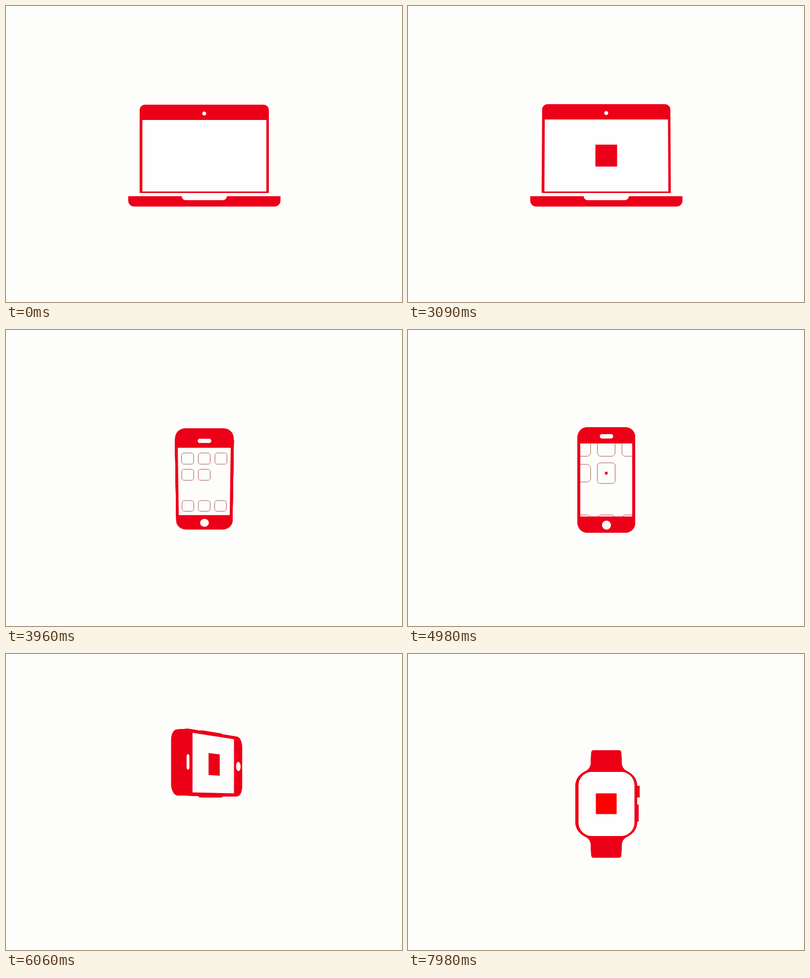
Write an HTML page with a canvas that moves like this. It is 800 px wide and 600 px high and loops after 8 s.

```html
<!DOCTYPE html>
<html lang="en">
<head>
<meta charset="utf-8">
<title>Devices</title>
<style>
  html, body { margin: 0; width: 100%; height: 100%; overflow: hidden; background: #fdfdfb; }
  canvas { display: block; }
</style>
</head>
<body>
<canvas id="stage" width="800" height="600"></canvas>
<script>
const ctx = document.getElementById('stage').getContext('2d');
const LOOP = 8000, CX = 400.5, CY = 304;
const RED = '#ec0018', BRIGHT = '#fe0000', PAPER = '#fdfdfb', SCREEN = '#fefefe';
const LINE = '#a0504a', SELECT = '#dd6040';
const RAD = Math.PI / 180;

// --- timing ---
const cubic = p => p < 0.5 ? 4 * p ** 3 : 1 - 4 * (1 - p) ** 3;
const out = p => 1 - (1 - p) ** 3;
const linear = p => p;

function tween(t, keys, ease = cubic) {
  if (t <= keys[0][0]) return keys[0][1];
  for (let i = 1; i < keys.length; i++) {
    const [t0, v0] = keys[i - 1], [t1, v1] = keys[i];
    if (t < t1) return v0 + (v1 - v0) * ease((t - t0) / (t1 - t0));
  }
  return keys[keys.length - 1][1];
}

// --- outlines, in coordinates around the stage centre ---
function box(x0, y0, x1, y1, r = 0, rBottom = r) {
  const points = [];
  const corner = (x, y, radius, start) => {
    const steps = radius ? 10 : 0;
    for (let i = 0; i <= steps; i++) {
      const a = (start + (steps ? 90 * i / steps : 0)) * RAD;
      points.push([x + radius * Math.cos(a), y + radius * Math.sin(a)]);
    }
  };
  corner(x0 + r, y0 + r, r, 180);
  corner(x1 - r, y0 + r, r, 270);
  corner(x1 - rBottom, y1 - rBottom, rBottom, 0);
  corner(x0 + rBottom, y1 - rBottom, rBottom, 90);
  return points;
}
const centred = (x, y, w, h, r) => box(x - w / 2, y - h / 2, x + w / 2, y + h / 2, r);
const disc = (x, y, r) => centred(x, y, 2 * r, 2 * r, r);

function watchOutline() {
  const curve = (a, c, b) => Array.from({ length: 9 }, (_, i) => {
    const u = i / 8, v = 1 - u;
    return [0, 1].map(n => v * v * a[n] + 2 * u * v * c[n] + u * u * b[n]);
  });
  const quarter = [
    ...curve([25, -109], [30, -109], [30.5, -103]),
    ...curve([31, -83], [32, -71], [43, -66]),
    ...curve([43, -66], [62.5, -56], [62.5, -35])
  ];
  const flip = (list, sx, sy) => list.map(([x, y]) => [x * sx, y * sy]);
  const right = [...quarter, ...flip(quarter, 1, -1).reverse()];
  return [...right, ...flip(right, -1, 1).reverse()];
}
const WATCH = watchOutline();

// --- projection ---
function projector(pose) {
  const { rx = 0, ry = 0, rz = 0, sx = 1, sy = 1, scale = 1,
          x: dx = 0, y: dy = 0, pivot = 0, d = 1450, depth = 0 } = pose;
  const [cx, cy, cz] = [rx, ry, rz].map(a => Math.cos(a * RAD));
  const [nx, ny, nz] = [rx, ry, rz].map(a => Math.sin(a * RAD));
  return ([px, py], pz = depth / 2) => {
    px *= sx;
    py = (py - pivot) * sy;
    let x = px * cz - py * nz, y = px * nz + py * cz, z = pz;
    [y, z] = [y * cx + z * nx, z * cx - y * nx];
    [x, z] = [x * cy + z * ny, z * cy - x * ny];
    const k = d / (d + scale * (depth / 2 - z));
    return [CX + (x * scale + dx) * k, CY + (y * scale + dy + pivot) * k];
  };
}

function trace(project, points, z) {
  ctx.beginPath();
  points.forEach(p => ctx.lineTo(...project(p, z)));
  ctx.closePath();
}
function fill(project, points, color, z) {
  trace(project, points, z);
  ctx.fillStyle = color;
  ctx.fill();
}
function stroke(project, points, color) {
  trace(project, points);
  ctx.strokeStyle = color;
  ctx.lineWidth = 1;
  ctx.stroke();
}
function extrude(project, points, from, to) {
  for (let z = from; z < to; z++) fill(project, points, RED, z);
  fill(project, points, RED, to);
}
function clipped(project, points, draw) {
  ctx.save();
  trace(project, points);
  ctx.clip();
  draw();
  ctx.restore();
}
const emblem = (project, y, size, color = RED) => {
  if (size > 0.2) fill(project, centred(0, y, size, size), color);
};

// --- laptop ---
const LID_SCREEN = box(-125, -73, 125.5, 72);
const ARROW = [[0, 0], [0, 22], [4.5, 18], [8.5, 26], [11.5, 24.5], [8.5, 16], [14.5, 14.5]];

function drawEditor(t, project) {
  const size = tween(t, [[950, 0], [1300, 0.6], [1890, 0.6], [2320, 1]]);
  emblem(project, 0, 44 * size);

  const half = 29.2 * size;
  if (size > 0 && t < 2430) {
    stroke(project, centred(0, 0, 2 * half, 2 * half), SELECT);
    for (const x of [-half, half])
      for (const y of [-half, half]) {
        const handle = centred(x, y, 5.5, 5.5);
        fill(project, handle, SCREEN);
        stroke(project, handle, SELECT);
      }
  }
  if (t > 1150 && t < 2850) {
    const away = tween(t, [[1150, 1], [1750, 0], [2430, 0], [2820, 1]]);
    const tip = half - 1 + (95 - half) * away;
    fill(project, ARROW.map(([x, y]) => [x + tip, y + tip]), RED);
  }
}

function drawLaptop(t) {
  const sx = tween(t, [[3460, 1], [3620, 0.45]]);
  const base = projector({ sx, y: tween(t, [[3460, 0], [3620, -15]]) });
  fill(base, box(-153.5, 81.5, 154, 102.5, 0, 12), RED);
  fill(base, box(-45.5, 81, 45.5, 89.5, 0, 8), PAPER);

  const lid = projector({
    sx, d: 640, pivot: 75,
    rx: tween(t, [[2990, 0], [3250, -7], [3620, 105]]),
    sy: tween(t, [[2990, 1], [3250, 1.045], [3450, 1]])
  });
  fill(lid, box(-130.5, -104, 130.5, 75, 11, 0), RED);
  fill(lid, disc(0, -86, 4), PAPER);
  fill(lid, LID_SCREEN, SCREEN);
  clipped(lid, LID_SCREEN, () => drawEditor(t, lid));
}

// --- phone ---
const PHONE = box(-58, -107, 58.5, 107, 20);
const PHONE_SCREEN = box(-52.5, -74, 52.5, 74);

// Shared by the phone and the watch that takes over in mid-air.
const hopY = t => tween(t, [[5400, 0], [5670, -21], [5860, -105], [6400, 15], [6500, 0]]);
const hopScale = t => tween(t, [[5400, 1], [5700, 1.1], [6100, 1.1], [6450, 1]]);

function drawApps(t, project) {
  const open = tween(t, [[4800, 0], [5360, 1]]);
  const y0 = -16 + 16 * open, zoom = 1 + 3.6 * open;
  if (open < 1) {
    for (const row of [-35, 0, 69])
      for (const col of [-1, 0, 1]) {
        if (row === 0 && col >= 0) continue;
        const size = 24 * zoom;
        stroke(project, centred(col * 33.3 * zoom, y0 + row * zoom, size, size, 5 * zoom), LINE);
      }
    stroke(project, centred(0, y0, 24 + 88 * open, 24 + 132 * open, 5 + 4 * open), LINE);
  }
  emblem(project, y0, 40 * open);
}

function drawPhone(t) {
  const project = projector({
    depth: 23,
    rx: tween(t, [[3620, 80], [4200, 0]]),
    ry: tween(t, [[5860, 0], [6060, 58], [6220, 89]], linear),
    rz: tween(t, [[5680, 0], [5980, -90]]),
    x: tween(t, [[5860, 0], [6060, 9.5], [6220, 0]]),
    y: hopY(t) + tween(t, [[3620, 60], [3900, 0]]),
    scale: hopScale(t)
  });
  const bump = tween(t, [[5700, 0], [5950, 2.5]]);
  if (bump) extrude(project, box(-58 - bump, -30, 58.5 + bump, 42, 2), -4, 4);
  extrude(project, PHONE, -11.5, 11.5);
  fill(project, centred(0.5, -88.5, 27, 9, 4.5), PAPER);
  fill(project, disc(0.5, 91.5, 9), PAPER);
  fill(project, PHONE_SCREEN, PAPER);
  clipped(project, PHONE_SCREEN, () => drawApps(t, project));
}

// --- watch ---
function drawWatch(t) {
  const project = projector({
    depth: 22,
    ry: tween(t, [[6220, -89], [6720, 18], [7050, 0]], out),
    y: hopY(t) + tween(t, [[7330, 0], [7520, -45], [7760, 0]]),
    scale: hopScale(t)
  });
  extrude(project, box(55, -37, 67.5, -13, 2), 0, 11);
  extrude(project, box(55, 1, 65.5, 36, 1.5), 0, 11);
  extrude(project, WATCH, -11, 11);
  fill(project, box(-56, -65, 57, 65, 27), SCREEN);
  emblem(project, -0.5, 42, BRIGHT);
}

function frame(now) {
  const t = now % LOOP;
  ctx.fillStyle = PAPER;
  ctx.fillRect(0, 0, 800, 600);
  (t < 3620 ? drawLaptop : t < 6220 ? drawPhone : drawWatch)(t);
  requestAnimationFrame(frame);
}
requestAnimationFrame(frame);
</script>
</body>
</html>
```
